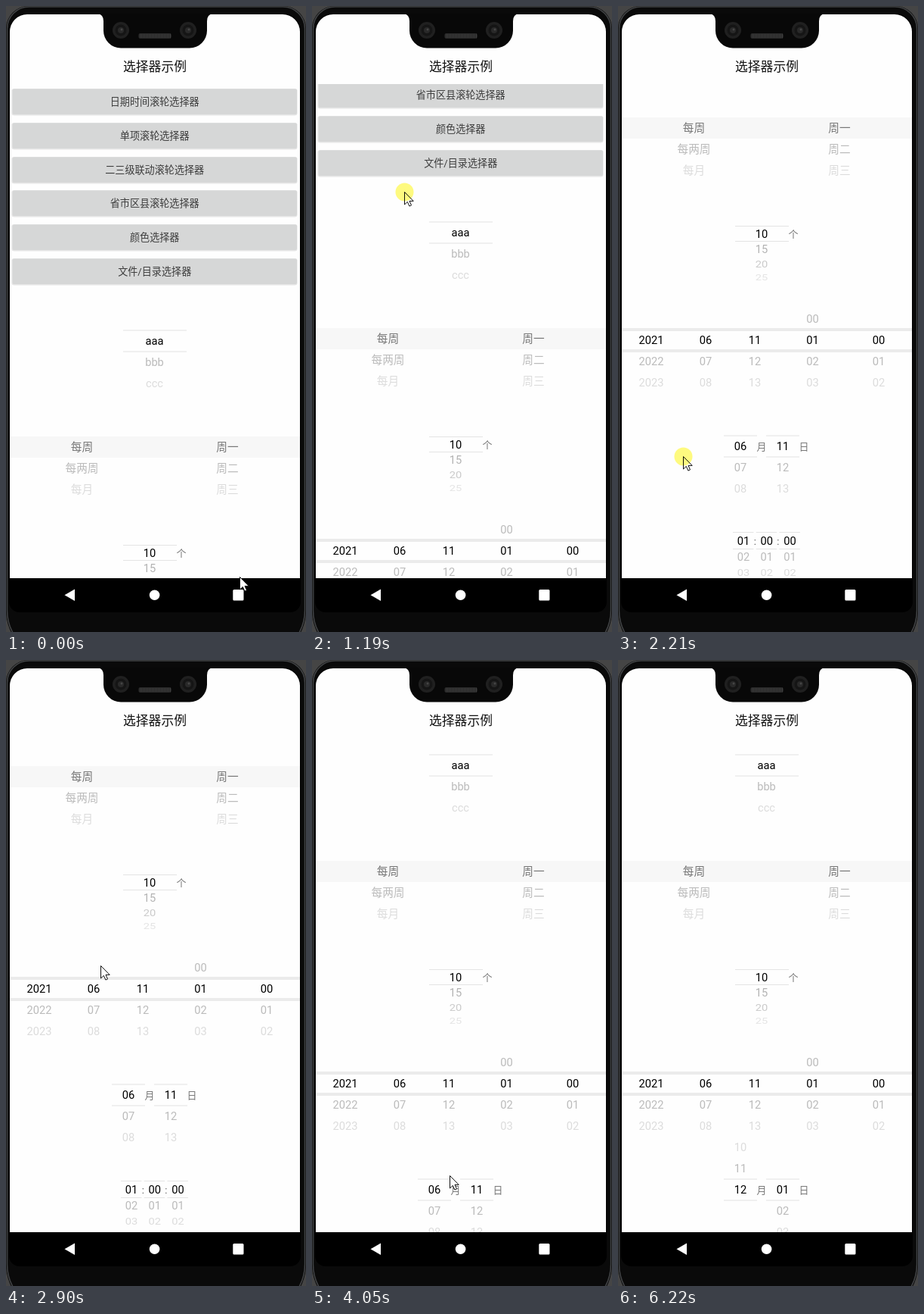
Write an HTML page with a canvas that moves like this. It is 397 by 826 pixels and loops after 6.54 s.

```html
<!DOCTYPE html>
<html lang="zh-CN">
<head>
<meta charset="utf-8">
<style>
html, body { margin: 0; width: 100%; height: 100%; overflow: hidden; background: #0a0a0a; }
canvas { display: block; }
</style>
</head>
<body>
<canvas id="stage" width="397" height="826"></canvas>
<script>
const c = document.getElementById('stage').getContext('2d');
const LOOP = 6540, STEP = 77.2;
const FONT = 'px Roboto, "Noto Sans CJK SC", "Noto Sans CJK", sans-serif';

// Smooth 0..1 progress between two times.
function ease(t, from, to) {
  const p = Math.min(1, Math.max(0, (t - from) / (to - from)));
  return p * p * (3 - 2 * p);
}

const scrollAt = t => Math.round(
  340 * ease(t, 848, 1618) + 88 * ease(t, 2040, 2229) - 125 * ease(t, 3610, 4040));
const monthAt = t => 6 * ease(t, 4230, 4720);

// Mouse stops; held means the button is down on the way to the next stop.
const stops = [
  { t: 70, x: 309, y: 753 },
  { t: 650, x: 91, y: 490, held: true },
  { t: 815, x: 91, y: 490, held: true },
  { t: 1350, x: 130, y: 180 },
  { t: 1500, x: 130, y: 180 },
  { t: 2060, x: 86, y: 704, held: true },
  { t: 2400, x: 87, y: 392 },
  { t: 2780, x: 120, y: 376 },
  { t: 3400, x: 185, y: 698 },
  { t: 3585, x: 188, y: 631 },
  { t: 3630, x: 188, y: 631, held: true },
  { t: 3850, x: 187, y: 742 },
  { t: 4048, x: 182, y: 680 },
  { t: 4220, x: 168, y: 705, held: true },
  { t: 4480, x: 170, y: 543 },
  { t: 4820, x: 268, y: 666 },
  { t: 5510, x: 323, y: 772 },
  { t: 5800, x: 304, y: 735 },
  { t: 6200, x: 346, y: 826 },
];

function mouseAt(t) {
  const next = stops.findIndex(s => s.t > t);
  if (next < 1) return stops[0];
  const a = stops[next - 1], b = stops[next], p = ease(t, a.t, b.t);
  return { x: a.x + (b.x - a.x) * p, y: a.y + (b.y - a.y) * p, held: a.held };
}

function rect(x, y, w, h, color, r = 0) {
  c.fillStyle = color;
  c.beginPath();
  c.roundRect(x, y, w, h, r);
  c.fill();
}

function disc(x, y, r, color) {
  c.fillStyle = color;
  c.beginPath();
  c.arc(x, y, r, 0, 7);
  c.fill();
}

function text(str, x, y, size, color) {
  c.font = size + FONT;
  c.textAlign = 'center';
  c.fillStyle = color;
  c.fillText(str, x, y + Math.round(size * .36));
}

function lines(x, w, y, half) {
  for (const dy of [-half, half]) rect(x, y + dy - .5, w, 1, '#e4e4e4');
}

// Flat wheels space rows evenly; a radius bends them round a cylinder.
function wheel(x, y, items, { index = 0, color = '#000', radius = 0, reach = 3 } = {}) {
  items.forEach((item, i) => {
    const d = i - index, far = Math.abs(d);
    if (far >= reach) return;
    const angle = d * .221, selected = far < .5;
    c.save();
    c.translate(x, y + (radius ? radius * Math.sin(angle) : Math.round(d * 28)));
    if (radius) c.scale(1, Math.cos(angle));
    c.globalAlpha = selected ? 1 : 1 - far / reach;
    text(item, 0, 0, 14.7, selected ? color : '#999');
    c.restore();
  });
}

const range = (from, n) => Array.from({ length: n }, (_, i) => String(from + i).padStart(2, '0'));

function page(t) {
  c.save();
  c.beginPath();
  c.rect(5, 103, 384, 652);
  c.clip();
  c.translate(0, -scrollAt(t));

  ['日期时间滚轮选择器', '单项滚轮选择器', '二三级联动滚轮选择器',
    '省市区县滚轮选择器', '颜色选择器', '文件/目录选择器'].forEach((label, i) => {
    const y = Math.round(126 + i * 44.8);
    rect(7.5, y - 17, 378, 35.5, '#e6e6e6', 3);
    rect(8.5, y - 16.5, 376.5, 33.5, '#d6d7d7', 2);
    text(label, 196.7, y, 13.1, '#3c3c3c');
  });

  lines(155, 84, 442, 14);
  wheel(196.5, 442, ['aaa', 'bbb', 'ccc']);

  rect(5, 568, 384, 28, '#f7f7f7');
  wheel(100.5, 582, ['每周', '每两周', '每月'], { color: '#777' });
  wheel(293, 582, ['周一', '周二', '周三'], { color: '#777' });

  lines(155, 71, 721.5, 10);
  wheel(190, 722, ['10', '15', '20', '25'], { radius: 93, reach: 4 });
  text('个', 232, 722, 13, '#777');

  for (const y of [846, 874]) rect(5, y, 384, 4, '#ebebeb');
  wheel(44, 862, range(2021, 3));
  wheel(116, 862, range(6, 3));
  wheel(181, 862, range(11, 3));
  wheel(257.5, 862, range(0, 4), { index: 1 });
  wheel(345, 862, range(0, 3));

  lines(140, 44, 1002, 14);
  lines(196, 44, 1002, 14);
  wheel(162, 1002, range(6, 7), { index: monthAt(t) });
  wheel(218, 1002, range(t < 4740 ? 11 : 1, 3));
  text('月', 190, 1002, 13, '#777');
  text('日', 246, 1002, 13, '#777');

  [1, 0, 0].forEach((first, i) => {
    const x = 166 + i * 30.7;
    lines(x - 14, 27.5, 1126.5, 11);
    wheel(x, 1127, range(first, 3), { radius: 98 });
    if (i) text(':', x - 15.5, 1127, 13, '#555');
  });
  c.restore();
}

function phone() {
  rect(0, 0, 397, 826, '#454545');
  rect(0, 0, 397, 860, '#0a0a0a', [30, 30, 62, 62]);
  c.lineWidth = 1.5;
  c.strokeStyle = '#424446';
  c.beginPath();
  c.roundRect(1.5, 1, 394, 858, [29, 29, 62, 62]);
  c.stroke();
  rect(4, 10, 386, 790, '#000', [24, 24, 14, 14]);
  rect(5, 11, 384, 744, '#fefefe', [23, 23, 0, 0]);

  c.fillStyle = '#080808';
  c.beginPath();
  c.moveTo(121, 10);
  c.quadraticCurveTo(129, 11, 129, 20);
  c.arcTo(129, 55.5, 153, 55.5, 23);
  c.arcTo(266, 55.5, 266, 32, 23);
  c.lineTo(266, 20);
  c.quadraticCurveTo(266, 11, 274, 10);
  c.fill();
  for (const x of [152, 241]) {
    ['#202020', '#151515', '#292929'].forEach((color, i) => disc(x, 32, 11 - i * 3.5, color));
    disc(x + 1, 31, 1.5, '#454545');
  }
  rect(175, 36, 44, 7, '#202020', 3);
  for (let x = 177; x < 218; x += 2) rect(x, 36.5, 1, 6, '#424242');

  c.fillStyle = '#fff';
  c.fill(new Path2D('M77.5 777.3L91 769.5V785Z'));
  disc(196.6, 777.2, 6.8, '#fff');
  rect(300.3, 770, 14.2, 14.4, '#fff', 1.5);
  text('选择器示例', 197, 80, 16.8, '#111');
}

const arrow = new Path2D('M0 0V16.5L3.8 12.9 6.4 18.6 9 17.4 6.5 11.9H11.7Z');

function cursor(t) {
  if (t > 6200) return;
  const { x, y, held } = mouseAt(t);
  c.save();
  c.translate(Math.round(x) + .5, Math.round(y) + .5);
  c.fillStyle = '#fff';
  c.fill(arrow);
  c.lineWidth = 1;
  c.strokeStyle = '#111';
  c.stroke(arrow);
  c.globalCompositeOperation = 'multiply';
  if (held) disc(0, 0, 12, '#fffb80');
  c.restore();
}

function draw() {
  const now = performance.now() % LOOP;
  const t = 729 + Math.floor((now - 725) / STEP) * STEP;
  phone();
  page(t);
  cursor(t);
  requestAnimationFrame(draw);
}
draw();
</script>
</body>
</html>
```
